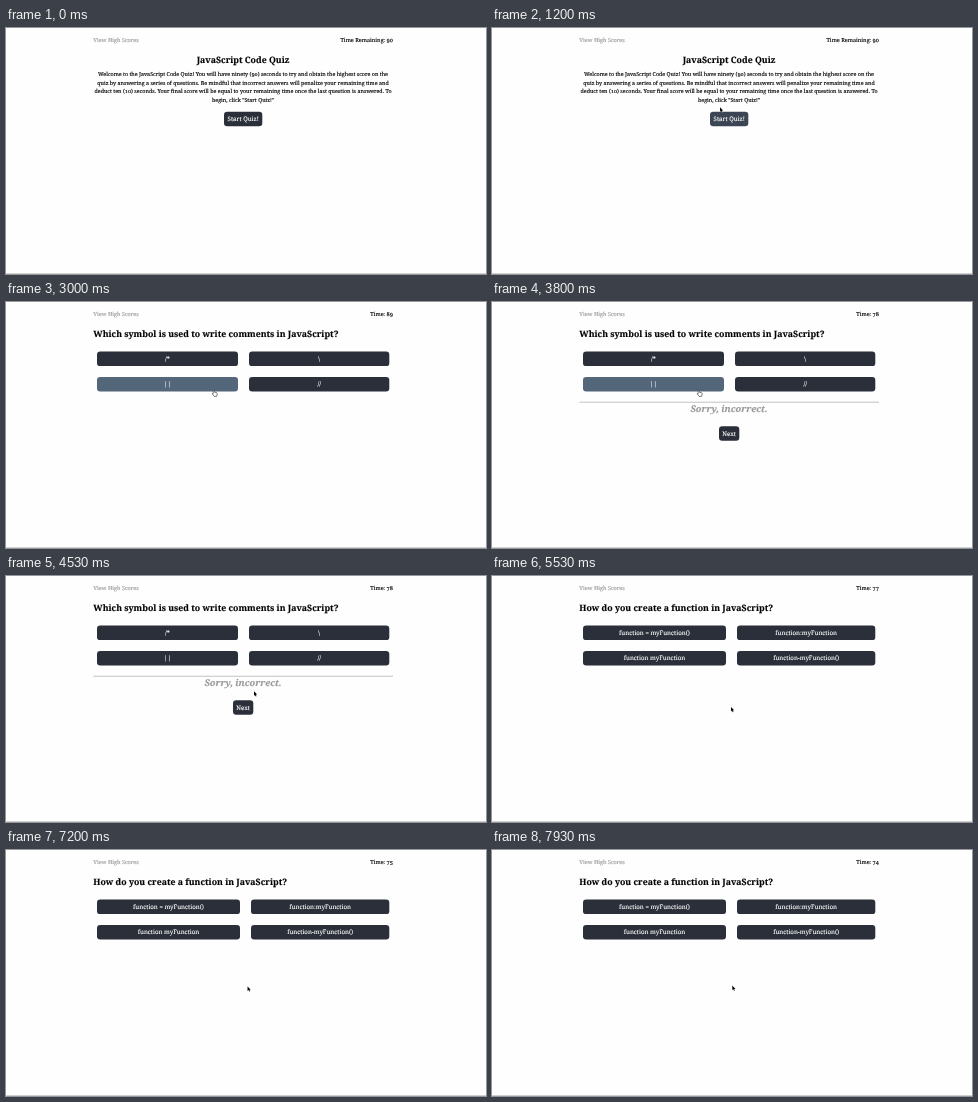
Animation of 480x246 px, one loop 8000 ms. Source, as an HTML page:

```html
<!DOCTYPE html>
<html lang="en">
<head>
<meta charset="utf-8">
<title>JavaScript Code Quiz</title>
<style>
  html, body { margin: 0; height: 100%; overflow: hidden; background: #fefefe; }
  svg { display: block; width: 100vw; height: 100vh; }
  text { font: 5.4px "Noto Serif", Georgia, serif; font-variant-numeric: oldstyle-nums;
         text-rendering: geometricPrecision; color: #000;
         fill: currentColor; stroke: currentColor; stroke-width: 0.13px; }
  .nav { font-size: 5.5px; }
  .link { color: #999; }
  .heading { font-size: 8.75px; font-weight: 700; }
  .label { font-size: 6.13px; color: #fff; }
  .verdict { font-size: 9.2px; font-weight: 700; font-style: italic; color: #999; }
  .mid { text-anchor: middle; }
  .end { text-anchor: end; }
</style>
</head>
<body>
<svg id="stage" viewBox="0 0 480 246"></svg>
<script>
const LOOP = 8000, STEP = 1000 / 15;
const ENTER = 730, START = 1660, ANSWER = 3525, NEXT = 5525;
const DARK = [42, 47, 57], HOVER = [84, 103, 122];
const stage = document.getElementById('stage');
const scenes = [], buttons = [];

function add(parent, tag, attrs, content = '') {
  const node = document.createElementNS('http://www.w3.org/2000/svg', tag);
  for (const key in attrs) node.setAttribute(key, attrs[key]);
  node.textContent = content;
  return parent.appendChild(node);
}
const write = (parent, x, y, style, content) => add(parent, 'text', { x, y, class: style }, content);

function addScene(from, to) {
  const scene = { from, to, node: add(stage, 'g', {}) };
  scenes.push(scene);
  return scene;
}
const active = (scene, t) => t >= scene.from && t < scene.to;

function button(scene, x, y, width, content) {
  const height = 14.5;
  const node = add(scene.node, 'rect', { x, y, width, height, rx: 3.2 });
  write(scene.node, x + width / 2, y + height / 2 + 2.2, 'label mid', content);
  buttons.push({ node, scene, x, y, width, height });
}

function question(from, to, title, split, answers) {
  const scene = addScene(from, to);
  write(scene.node, 87.3, 35, 'heading', title);
  answers.forEach((answer, i) => {
    const right = i % 2, x = right ? split + 11 : 91;
    button(scene, x, 49.6 + 25.3 * (i >> 1), (right ? 383.3 : split) - x, answer);
  });
}

add(stage, 'rect', { y: 245, width: 480, height: 1, fill: '#d0d0d0' });
write(stage, 87.3, 14.3, 'nav link', 'View High Scores');
const timer = write(stage, 387, 14.3, 'nav end', '');

const intro = addScene(0, START);
write(intro.node, 237, 35, 'heading mid', 'JavaScript Code Quiz');
[
  'Welcome to the JavaScript Code Quiz! You will have ninety (90) seconds to try and obtain the highest score on the',
  'quiz by answering a series of questions. Be mindful that incorrect answers will penalize your remaining time and',
  'deduct ten (10) seconds. Your final score will be equal to your remaining time once the last question is answered. To',
  'begin, click "Start Quiz!"'
].forEach((line, i) => write(intro.node, 237, 48.1 + 8.65 * i, 'mid', line));
button(intro, 218, 83.8, 38.3, 'Start Quiz!');

question(START, NEXT, 'Which symbol is used to write comments in JavaScript?', 232, ['/*', '\\', '||', '//']);
question(NEXT, LOOP, 'How do you create a function in JavaScript?', 234,
  ['function = myFunction()', 'function:myFunction', 'function myFunction', 'function-myFunction()']);

const verdict = addScene(ANSWER, NEXT);
add(verdict.node, 'rect', { x: 87.3, y: 99.8, width: 299.7, height: 0.7, fill: '#aaa' });
write(verdict.node, 237, 110, 'verdict mid', 'Sorry, incorrect.');
button(verdict, 227, 124.3, 20.3, 'Next');

const arrow = add(stage, 'path', {
  d: 'M0 0V4.5L1 3.6 1.7 5.2 2.5 4.9 1.8 3.3H3.2Z',
  stroke: '#fff', 'stroke-width': 0.4, 'paint-order': 'stroke'
});
const hand = add(stage, 'path', {
  d: 'M-.5 3V.7Q.1-.1 .7 .7V2.6L3.1 3.2Q3.7 3.5 3.5 4.6L2.9 6.8H.4L-1.5 4.2Q-1.3 3.4-.5 4Z',
  fill: '#fff', stroke: '#222', 'stroke-width': 0.6
});

// Pointer stops: arrival time, x, y. It rests at each one until the next move begins.
const MOVE = 550;
const stops = [
  [ENTER, 262, 221], [1000, 212, 112], [1200, 228, 79.3], [1470, 235, 88.6],
  [3070, 206.5, 87.5], [4330, 248, 115.3], [5080, 239, 131], [6070, 242.5, 137], [7500, 240.3, 135.6]
];

const clamp = v => Math.min(1, Math.max(0, v));
const mix = (a, b, k) => a + (b - a) * k;
const show = (node, on) => node.setAttribute('display', on ? 'inline' : 'none');

function pointer(t) {
  let [, x, y] = stops[0];
  for (let i = 1; i < stops.length; i++) {
    const [end, toX, toY] = stops[i], begin = Math.max(stops[i - 1][0], end - MOVE);
    const k = clamp((t - begin) / (end - begin)), eased = k * k * (3 - 2 * k);
    x = mix(x, toX, eased);
    y = mix(y, toY, eased);
  }
  return [x, y];
}

function hit(b, t) {
  const [x, y] = pointer(t);
  return active(b.scene, t) && x > b.x && x < b.x + b.width && y > b.y && y < b.y + b.height;
}

// Share of the last 150 ms spent over the button
function hoverLevel(b, t) {
  let hits = 0;
  for (let i = 0; i < 10; i++) hits += hit(b, t - i * 15);
  return hits / 10;
}

function render(time) {
  const t = Math.floor((time % LOOP + 5) / STEP) * STEP + 1;
  for (const scene of scenes) show(scene.node, active(scene, t));

  const elapsed = Math.max(0, Math.floor((t - START - 100) / 1000));
  const penalty = elapsed > 1 ? 10 : 0;
  timer.textContent = (t < START ? 'Time Remaining: ' : 'Time: ') + (90 - elapsed - penalty);

  for (const b of buttons) {
    const k = hoverLevel(b, t);
    b.node.setAttribute('fill', `rgb(${DARK.map((c, i) => Math.round(mix(c, HOVER[i], k)))})`);
  }
  const pointing = buttons.some(b => hit(b, t));
  for (const cursor of [arrow, hand]) {
    cursor.setAttribute('transform', `translate(${pointer(t)})`);
    show(cursor, t > ENTER && pointing === (cursor === hand));
  }
}

function loop() {
  render(performance.now());
  requestAnimationFrame(loop);
}
loop();
</script>
</body>
</html>
```
